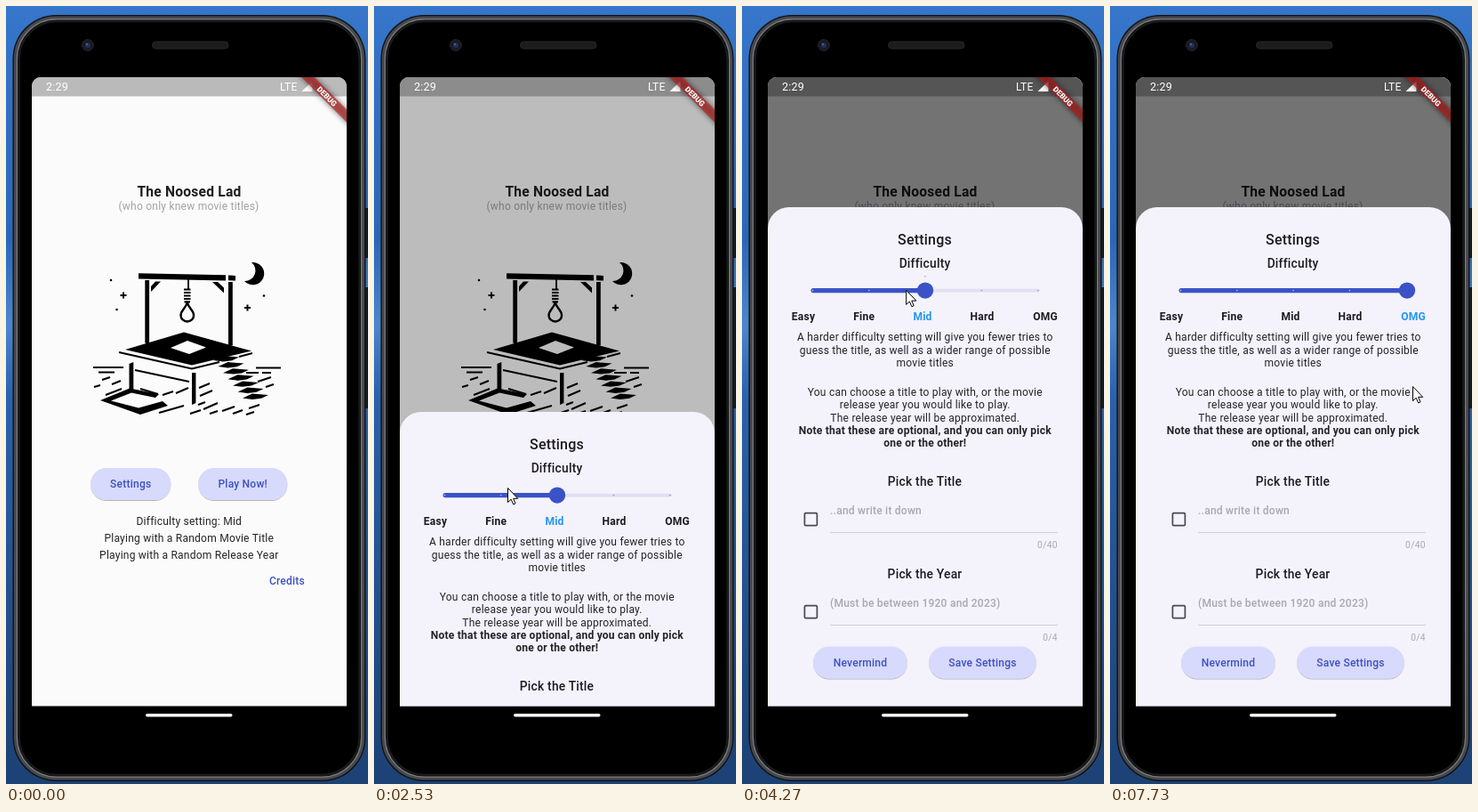
Write an HTML page that moves like this. It is 407x874 px and loops after 8000 ms.

```html
<!DOCTYPE html>
<html lang="en">
<head>
<meta charset="utf-8">
<title>Word game settings</title>
<style>
  html, body { margin: 0; width: 100%; height: 100%; overflow: hidden; background: #2a62ad; }
  svg { display: block; width: 407px; height: 874px; }
  text { font: 400 12.05px Roboto, sans-serif; letter-spacing: .215px; fill: #242427; text-anchor: middle; }
  .med { font-weight: 500; }
  .bold { font-weight: 700; }
  .link { font-weight: 500; fill: #3d50c2; }
  .head { font-size: 13.8px; font-weight: 500; fill: #1d1b20; }
  .hint { font-weight: 500; fill: #a9a7b0; text-anchor: start; }
  .count { font-size: 10.3px; letter-spacing: .34px; fill: #a9a7b0; text-anchor: end; }
  .bar { fill: #fff; text-anchor: start; }
</style>
</head>
<body>
<svg id="stage" viewBox="0 0 407 874">
  <defs>
    <linearGradient id="sky" x2="0" y2="1">
      <stop offset="0" stop-color="#3676cb"/>
      <stop offset=".3" stop-color="#2a67b8"/>
      <stop offset=".41" stop-color="#4c86cc"/>
      <stop offset=".5" stop-color="#2a62ad"/>
      <stop offset="1" stop-color="#1c4175"/>
    </linearGradient>
    <clipPath id="screen"><path d="M29 786.4V90a10 10 0 0 1 10-10H373a10 10 0 0 1 10 10V786.4Z"/></clipPath>
    <filter id="lift" x="-10%" y="-20%" width="120%" height="150%">
      <feDropShadow dx="0" dy="1" stdDeviation=".7" flood-opacity=".28"/>
    </filter>
    <filter id="blur" x="-20%" y="-150%" width="140%" height="400%">
      <feGaussianBlur stdDeviation="3.2"/>
    </filter>
  </defs>

  <rect width="407" height="874" fill="url(#sky)"/>
  <path d="M403 227h4v56h-4zM403 316h4v136h-4z" fill="#17191d"/>
  <rect x="7.5" y="10" width="397" height="861" rx="49" fill="#141516"/>
  <rect x="10.7" y="13.2" width="390.6" height="854.6" rx="46" fill="none" stroke="#47494c" stroke-width="3.4"/>
  <rect x="12.4" y="14.9" width="387.2" height="851.2" rx="44.5" fill="none" stroke="#7b7d81" stroke-width="1.2"/>
  <rect x="15" y="17.5" width="382" height="846" rx="42" stroke="#1d1e20" stroke-width="1.5"/>
  <rect x="164.5" y="40" width="85.5" height="8" rx="4" fill="#1c1c1d" stroke="#2b2b2c" stroke-width=".8"/>
  <circle cx="92" cy="44" r="6.3" fill="#171a22" stroke="#262932"/>
  <circle cx="92" cy="44" r="3" fill="#232f55"/>
  <circle cx="91" cy="43" r="1" fill="#566aa5"/>
  <rect x="157" y="795" width="97.5" height="3.6" rx="1.8" fill="#fff"/>

  <g clip-path="url(#screen)">
    <rect x="29" y="80" width="354" height="707" fill="#fbfbfb"/>
    <rect x="29" y="80" width="354" height="21.5" fill="#bababa"/>
    <g id="home"></g>
    <rect id="barrier" x="29" y="80" width="354" height="707"/>
    <text class="bar" x="45" y="95.3" style="font-size:12.6px">2:29</text>
    <text class="bar" x="308" y="94.8">LTE</text>
    <path d="M344.5 84.5V96H332.5Z" fill="#fff"/>
    <g id="sheet"></g>
    <g transform="translate(361 101.5) rotate(45)">
      <rect x="-50" y="-5.2" width="100" height="10.4" opacity=".5" filter="url(#blur)"/>
      <rect x="-50" y="-5.2" width="100" height="10.4" fill="#b71c1c" fill-opacity=".63"/>
      <text y="3.1" style="font-size:8.6px;font-weight:900;fill:#fff;letter-spacing:0">DEBUG</text>
    </g>
  </g>

  <path id="cursor" d="M.5 .5V16.6L4.2 13.2 6.7 18.9 9 17.9 6.6 12.3H11.7Z" fill="#fff" stroke="#000" stroke-linejoin="round"/>
</svg>

<script>
const $ = id => document.getElementById(id);
const text = (x, y, s, cls = '', style = '') =>
  `<text x="${x}" y="${y}" class="${cls}" style="${style}">${s}</text>`;
const line = (d, w = 2) => `<path d="${d}" fill="none" stroke="#000" stroke-width="${w}"/>`;
const pill = (x, y, w, s) =>
  `<rect x="${x}" y="${y}" width="${w}" height="36" rx="18" fill="#d7dafc" filter="url(#lift)"/>` +
  text(x + w / 2, y + 22.3, s, 'link');

function gallows() {
  let stairs = '';
  for (let i = 0; i < 7; i++) {
    stairs += `M${233 + 5.5 * i} ${398 + 7.1 * i}l11 -5 18 1.5 -8 3.7 -10 1.2z`;
  }
  const solid = [
    'M149 300.3 247 302.3V308.4L149 306.6Z', 'M250 302.6 258 302.9V308.6L250 308.3Z',
    'M156.3 308h4.8V380l-4.8 -1.5Z', 'M250 310h4.8V381l-4.8 1.5Z',
    'M163 321V315L168 309.5H174Z', 'M232 310H238L245 316.5V322.5Z',
    'M276 288A12.7 12.7 0 1 1 268 309A11.8 11.8 0 0 0 276 288Z',
    'M134 386 200 366.5 276 387.5 209 403.5ZM185 384 206 391 225 383.5 204 376Z',
    'M138.5 402 143.3 400V431.5L138.5 430Z', 'M209 412h4.4V446l-4.4 2Z',
    'M106 443 139 429.5 172 436 168 440 141 434.5 118 443.5 149 451.5 176 444 182 449 151 459Z',
    stairs
  ].map(d => `<path d="${d}" fill-rule="evenodd"/>`).join('');
  const noose = line('M205 303V318', 1.8) +
    line('M200 318.5H207.5M200 322H207.5M200 325.5H207.5M200 329H207.5M200.5 332.3H207', 2.2) +
    line('M203.8 333C202 340 196.5 342 196.5 347.5a7.3 7 0 0 0 14.6 0C211 342 205.6 340 203.8 333Z', 2.4);
  const stars = line('M132 321.5v7M128.5 325h7M271.5 335.5v7M268 339h7', 2) +
    [[118, 308], [124.5, 341], [290, 325.5]].map(([x, y]) => `<circle cx="${x}" cy="${y}" r="1.3"/>`).join('');
  const ground = line('M127 389 209 407.5 240 400M262 394 277 390M145 409 206 422', 2) +
    line('M98 406h34M104 411.5h18M108 420l9 -3M99 428l7 -2M119 425l10 -4M112 437l18 -7M281 406.5h28' +
      'M270 412h14M288 412h10M283 422l15 -5M292 428l9 -3M151 430l20 6M176 437l12 -4M191 435l14 -6' +
      'M172 457l28 -8M207 458l12 -4M222 453l16 -7M218 438l14 -6M229 458l9 -3M243 455l14 -5M255 458l11 -4' +
      'M217 429l12 -5M216 448l8 -3M273 452l12 -4M270 459l9 -3', 2.1);
  return solid + noose + stars + ground;
}

$('home').innerHTML =
  text(206, 213.6, 'The Noosed Lad', 'bold', 'font-size:15.6px;fill:#1e1e1e') +
  text(205.5, 229, '(who only knew movie titles)', '', 'fill:#a2a2a2') +
  gallows() +
  pill(95, 519, 90.5, 'Settings') + pill(216, 519, 100.5, 'Play Now!') +
  '<rect id="press" x="95" y="519" width="90.5" height="36" rx="18" fill="#5078b0"/>' +
  text(205.8, 583.4, 'Difficulty setting: Mid') +
  text(205.8, 602.2, 'Playing with a Random Movie Title') +
  text(205.8, 621, 'Playing with a Random Release Year') +
  text(316, 650.2, 'Credits', 'link');

const levels = ['Easy', 'Fine', 'Mid', 'Hard', 'OMG'];
const labelX = [69, 137.2, 203, 270, 341];
const bubbleHalf = [14, 14, 13, 15.4, 16.3];
const slotX = i => 78 + 64 * i;

const para = [
  [376, 'A harder difficulty setting will give you fewer tries to'],
  [390.5, 'guess the title, as well as a wider range of possible'],
  [405, 'movie titles'],
  [437.8, 'You can choose a title to play with, or the movie'],
  [452.2, 'release year you would like to play.'],
  [466.6, 'The release year will be approximated.'],
  [481, 'Note that these are optional, and you can only pick', 'bold'],
  [495.4, 'one or the other!', 'bold']
];

const field = (y, title, hint, count) =>
  text(205.5, y, title, 'head') + text(99, y + 32, hint, 'hint') +
  `<rect x="70.4" y="${y + 31.2}" width="14" height="14" rx="1.3" fill="none" stroke="#49474e" stroke-width="1.7"/>` +
  `<path d="M99 ${y + 53}H355" stroke="#d0ced8"/>` + text(355, y + 70.2, count, 'count');

$('sheet').innerHTML =
  '<path d="M29 790V250a24 24 0 0 1 24 -24H359a24 24 0 0 1 24 24V790Z" fill="#f4f2fb"/>' +
  text(205.5, 268.2, 'Settings', 'head', 'font-size:16px') +
  text(205.5, 294.2, 'Difficulty', 'head') +
  '<rect x="78" y="317.8" width="257" height="3.6" rx="1.8" fill="#e1dff0"/>' +
  '<rect id="track" x="77.5" y="317" height="5.2" rx="2.6" fill="#3b52c6"/>' +
  levels.map((s, i) => `<circle class="tick" cx="${79.5 + 63.3 * i}" cy="319.6" r=".8"/>`).join('') +
  '<circle id="thumb" cy="319.6" r="9.2" fill="#3b52c6"/>' +
  '<g id="bubble"><path id="shape" fill="#3b52c6"/>' +
  '<text id="value" y="-13.5" style="font-size:11px;fill:#fff;letter-spacing:0"></text></g>' +
  levels.map((s, i) => text(labelX[i], 353.2, s, 'bold level')).join('') +
  para.map(([y, s, cls]) => text(205.8, y, s, cls)).join('') +
  field(538.5, 'Pick the Title', '..and write it down', '0/40') +
  field(642.5, 'Pick the Year', '(Must be between 1920 and 2023)', '0/4') +
  pill(80, 719.5, 106, 'Nevermind') + pill(210, 719.5, 121, 'Save Settings');

const ticks = [...document.querySelectorAll('.tick')];
const labels = [...document.querySelectorAll('.level')];

const LOOP = 8000, STEP = 1000 / 15;
const clamp = v => Math.min(1, Math.max(0, v));
const ramp = (t, from, len) => clamp((t - from) / len);
const smooth = p => p * p * (3 - 2 * p);

// Pointer moves: start, end, target x, target y, sideways bend
const origin = [400, 868];
const moves = [
  [480, 930, 181, 674, 0],
  [1130, 1870, 150, 541, 0],
  [3330, 4130, 205, 318, 0],
  [4130, 4530, 128, 321, 0],
  [4830, 5670, 285, 321, 0],
  [5670, 6000, 335, 323, 0],
  [7150, 7730, 340, 427, 9]
];

function pointer(t) {
  let [x, y] = origin;
  for (const [a, b, tx, ty, bend] of moves) {
    if (t <= a) break;
    const p = smooth(ramp(t, a, b - a));
    x += (tx - x) * p + bend * Math.sin(Math.PI * p);
    y += (ty - y) * p;
  }
  return [x, y];
}

// Decelerating curve with control points (0, 0) and (.2, 1)
function decelerate(p) {
  let lo = 0, hi = 1;
  for (let i = 0; i < 24; i++) {
    const s = (lo + hi) / 2;
    if (.6 * (1 - s) * s * s + s ** 3 < p) lo = s; else hi = s;
  }
  return 3 * (1 - lo) * lo * lo + lo ** 3;
}

function slider(t, x) {
  const slot = t < 4200 ? 2 : t >= 7100 ? 4 : Math.round((x - 78) / 64);
  const cx = slotX(slot), h = bubbleHalf[slot], r = 13, k = Math.max(0, h - r);
  $('thumb').setAttribute('cx', cx);
  $('track').setAttribute('width', cx - 77);
  ticks.forEach((c, i) => c.setAttribute('fill', i <= slot ? '#b9c1f0' : '#8f97d0'));
  labels.forEach((l, i) => l.style.fill = i === slot ? '#2196f3' : '#1d1b20');

  const grow = ramp(t, 4262, 100) * (1 - ramp(t, 7170, 100));
  $('bubble').style.display = grow ? '' : 'none';
  $('bubble').setAttribute('transform', `translate(${cx} 304.6) scale(${grow})`);
  $('shape').setAttribute('d',
    `M0 0C-3 -3 -5 -4.6 ${-k - 6} -6.2A${r} ${r} 0 0 1 ${-k} -30.6H${k}` +
    `A${r} ${r} 0 0 1 ${k + 6} -6.2C5 -4.6 3 -3 0 0Z`);
  $('value').textContent = levels[slot];
}

function draw(now) {
  const t = Math.floor((now % LOOP + 5) / STEP) * STEP;
  const [x, y] = pointer(t);
  $('cursor').setAttribute('transform', `translate(${x} ${y})`);
  $('cursor').style.display = t < 530 ? 'none' : '';
  $('press').setAttribute('opacity', .1 * ramp(t, 2270, 180));

  const open = ramp(t, 2470, 245);
  $('sheet').style.display = open ? '' : 'none';
  $('sheet').setAttribute('transform', `translate(0 ${Math.round(560 * (1 - decelerate(open)))})`);
  $('barrier').setAttribute('opacity', .54 * (1 - (1 - open) ** 2.1));
  slider(t, x);
}

const start = performance.now();
function frame() {
  draw(performance.now() - start);
  requestAnimationFrame(frame);
}
frame();
</script>
</body>
</html>
```
